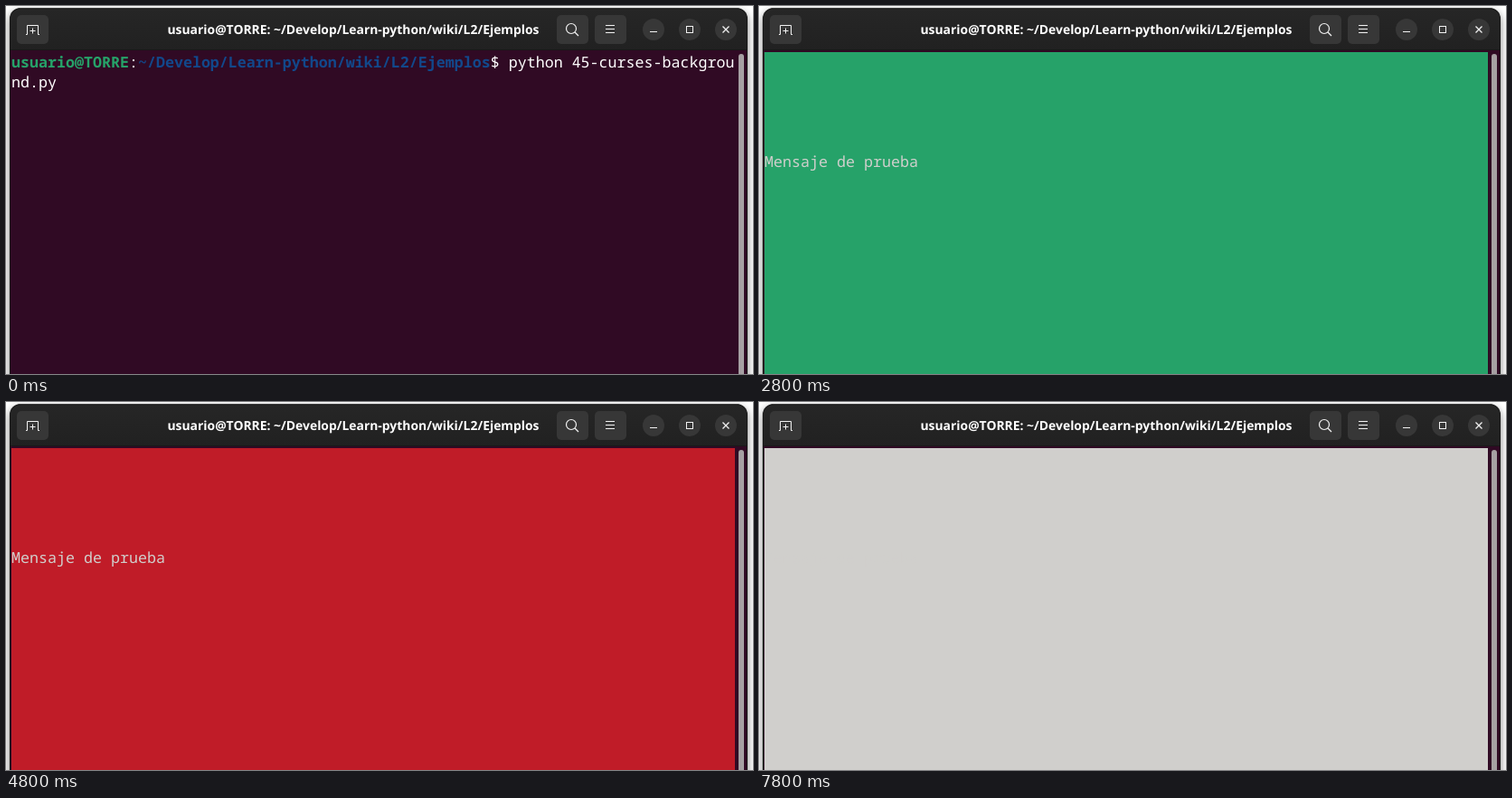
Animation, 826 px wide and 407 px high, one loop 8000 ms. Source, as an HTML page:

```html
<!DOCTYPE html>
<html lang="es">
<head>
<meta charset="utf-8">
<title>Terminal: curses background</title>
<style>
  html, body { margin: 0; width: 100%; height: 100%; overflow: hidden; background: #fff; }
  svg { display: block; width: 100%; height: 100%; }
  text { white-space: pre; text-rendering: geometricPrecision; }

  .title { font: 700 13.9px "Noto Sans", "Open Sans", sans-serif; fill: #fff; text-anchor: middle; }
  .term { font: 400 16.667px "Noto Sans Mono", "DejaVu Sans Mono", monospace; fill: #fff; }
  .user, .path { font-weight: 700; }
  .user { fill: #26a269; }
  .path { fill: #12488b; }
  .message { fill: #d0cfcc; }

  .button { fill: #373737; }
  .icon { fill: none; stroke: #f2f2f2; stroke-width: 1; }

  .cursor, .curses, .paper { animation: 8s step-end infinite; }
  .cursor { animation-name: blink; fill: #fff; }
  .curses { animation-name: open; }
  .paper { animation-name: colors; }

  @keyframes blink {
    0%, 10% { opacity: 0; }
    2.5%, 17.5%, 100% { opacity: 1; }
  }
  @keyframes open {
    0% { opacity: 0; }
    22.5%, 100% { opacity: 1; }
  }
  @keyframes colors {
    0% { fill: #12488b; }
    35% { fill: #26a269; }
    47.5% { fill: #a2734c; }
    60% { fill: #c01c28; }
    72.5% { fill: #a347ba; }
    85% { fill: #2aa1b3; }
    97.5%, 100% { fill: #d0cfcc; }
  }
</style>
</head>
<body>
<svg viewBox="0 0 826 407">
  <defs>
    <linearGradient id="header" x2="0" y2="1">
      <stop offset="0" stop-color="#262626"/>
      <stop offset="1" stop-color="#212121"/>
    </linearGradient>
    <filter id="blur" x="-5%" y="-5%" width="110%" height="110%">
      <feGaussianBlur stdDeviation="5"/>
    </filter>
  </defs>

  <!-- Window -->
  <rect width="826" height="407" fill="#fff"/>
  <rect x="4" y="6" width="816" height="450" rx="12" fill="#000" opacity=".5" filter="url(#blur)"/>
  <path d="M4 407V14a12 12 0 0 1 12-12H808a12 12 0 0 1 12 12V407z" fill="#1c1c1c"/>
  <path d="M5 49V14.500a11 11 0 0 1 11-11H808a11 11 0 0 1 11 11V49z" fill="url(#header)"/>
  <path d="M14 2.500H810" stroke="#3a3a3a"/>
  <path d="M5 49H819V407H5z" fill="#300a24"/>
  <path d="M5 48.500H819" stroke="#191919"/>
  <rect x="810" y="53" width="6" height="380" rx="3" fill="#a6a0a3"/>

  <!-- Header bar -->
  <g class="button">
    <rect x="12" y="10" width="35" height="32" rx="5"/>
    <rect x="609" y="10" width="35" height="32" rx="5"/>
    <rect x="651" y="10" width="35" height="32" rx="5"/>
    <circle cx="716" cy="26" r="12"/>
    <circle cx="756" cy="26" r="12"/>
    <circle cx="796" cy="26" r="12"/>
  </g>
  <g class="icon">
    <path d="M22 31.500h1.500v-10h12v10h1.500M29.500 24.500v6M26.500 27.500h6"/>
    <circle cx="625" cy="25" r="5.500" stroke-width="1.200"/>
    <path d="M629 29l4 4" stroke-width="1.300"/>
    <path d="M663 21.500h10M663 25.500h10M663 29.500h10"/>
    <path d="M712 28.500h8"/>
    <rect x="752.500" y="22.500" width="7" height="7"/>
    <path d="M792.500 22.500l7 7M799.500 22.500l-7 7" stroke-width="1.300"/>
  </g>
  <text class="title" x="384" y="31">usuario@TORRE: ~/Develop/Learn-python/wiki/L2/Ejemplos</text>

  <!-- Shell: 10 x 22 px cells -->
  <g class="term">
    <text x="6" y="68"><tspan class="user">usuario@TORRE</tspan>:<tspan class="path">~/Develop/Learn-python/wiki/L2/Ejemplos</tspan>$ python 45-curses-backgrou</text>
    <text x="6" y="90">nd.py</text>
    <rect class="cursor" x="66" y="73" width="10" height="22"/>
  </g>

  <!-- Curses screen -->
  <g class="term curses">
    <rect class="paper" x="6" y="51" width="800" height="356"/>
    <text class="message" x="6" y="178">Mensaje de prueba</text>
  </g>
</svg>
</body>
</html>
```
